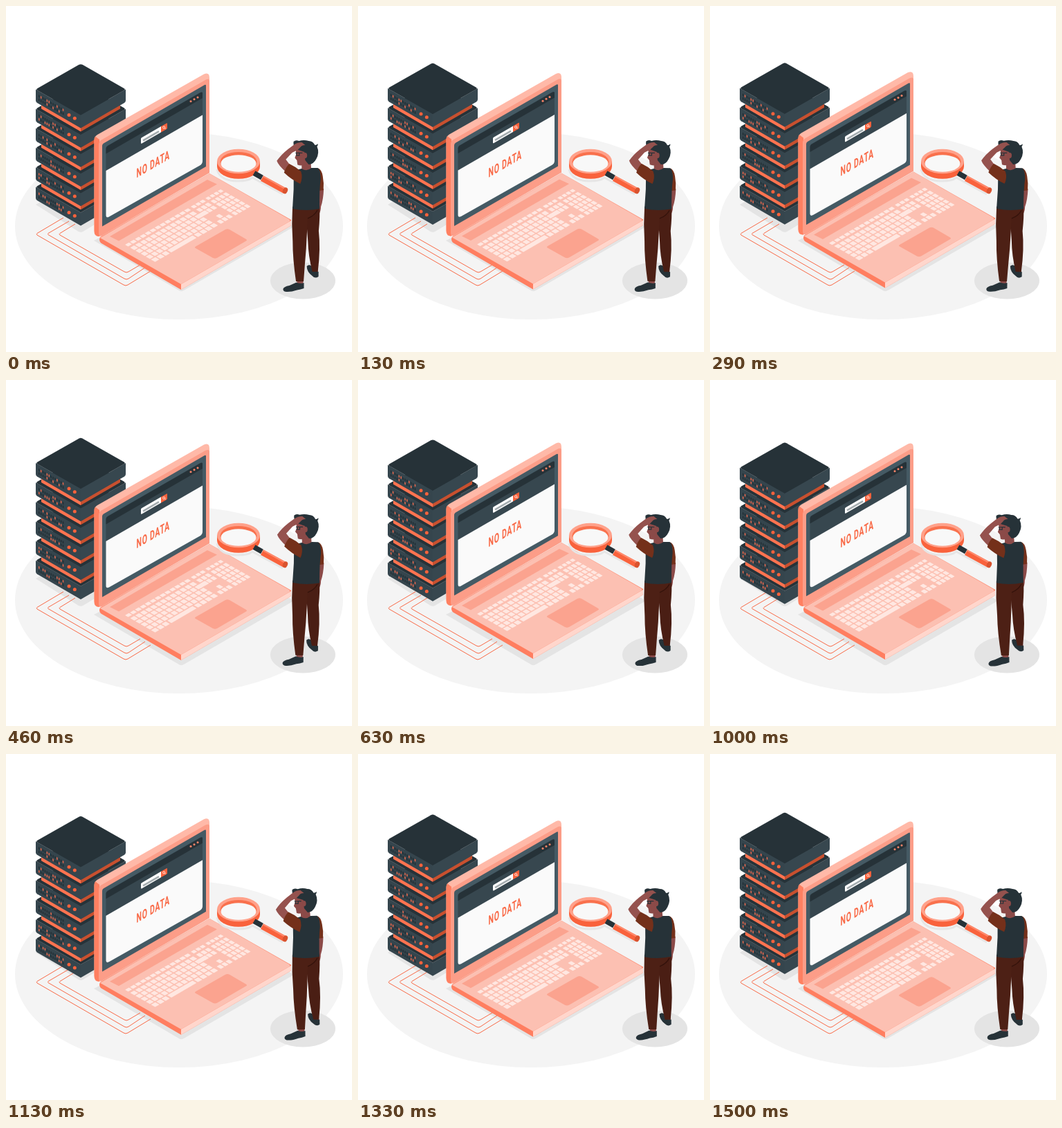
Recreate the animation shown at these times as an HTML page. Size 500 px wide and 500 px high, loop 1540 ms.

```html
<!DOCTYPE html>
<html lang="en">
<head>
<meta charset="utf-8">
<title>No data</title>
<style>
html, body { margin: 0; width: 100%; height: 100%; overflow: hidden; background: #fff; }
svg { display: block; width: 100%; height: 100%; }
text { font: 700 18.5px Roboto, Inter, sans-serif; letter-spacing: 1.2px; fill: #f96a47; }
</style>
</head>
<body>
<svg viewBox="0 0 500 500">
  <ellipse cx="250" cy="318" rx="237" ry="135" fill="#f4f4f4"/>
  <ellipse cx="429" cy="397" rx="47" ry="26.5" fill="#e4e4e4"/>
  <path d="M43 287L104 325.5Q108 328 112 325.5L173 289 108 250z" fill="#e4e4e4"/>
  <path d="M127 339L249 410.5Q253 413.5 257 411L416 319 300 250z" fill="#e4e4e4"/>
  <path d="M83 306L45 328.5Q43.5 329.5 45 331L170 403Q173 405 176 403L209 383M91 311L61 328.5Q60 329.5 61 330.5L171 394Q174 396 177 394L201 378M100 315L78 328.5Q76 329.5 78 331L171 384Q174 386 177 384L194 374" fill="none" stroke="#f96a47"/>

  <g id="servers"></g>

  <g id="laptop">
    <path d="M136 334L294 242 412 309V316Q412 317.5 410 318.5L253 410 138 343Q135 341 135 337z" fill="#ff7e60"/>
    <path d="M253 402L412 310V316Q412 317.5 410 318.5L253 410z" fill="#ffd6cc"/>
    <path d="M136 335L294 242 409 308Q412 310 409 311.7L253 402z" fill="#fcc0b2"/>
    <path d="M150 333L291 251 305 257.5 163 339.5z" fill="#fba38f"/>
    <path d="M274 347.5L317 323Q320 321.5 323 323L347 337Q349 338.3 347 339.5L305 364Q302 365.5 299 364L274 350Q272 349 274 347.5z" fill="#fba38f"/>
    <g id="keys" transform="matrix(1 -.58 1 .57 172 345)" fill="#ffe7e1"></g>

    <path d="M127.500 194Q127.500 188.500 132 186L286 98.500Q294 95 294 104V241L139 332Q127.500 336 127.500 325z" fill="#ffb9a8"/>
    <path d="M127.500 194Q127.500 190 129 188.500L135 193V333Q127.500 333 127.500 325z" fill="#ff8061"/>
    <path d="M134 200Q134 196 138 193.500L288 107Q294 104 294 109V241L139 332Q134 334 134 328z" fill="#fc9d88"/>
    <path d="M139 202Q139 199.500 141 198.400L287 114Q289 113 289 115V232L139 318.600z" fill="#455a64"/>
    <path d="M144.500 206Q144.500 203.500 147 202L281 125Q284 123.500 284 126V159L144.500 239z" fill="#37474f"/>
    <path d="M144.500 206Q144.500 203.500 147 202L281 125Q284 123.500 284 126V133L144.500 213.500z" fill="#263238"/>
    <path d="M144.500 238L284 157.500V224Q284 228 280 230.500L149 304.500Q144.500 307 144.500 302z" fill="#fafafa"/>
    <g fill="#ff8568"><circle cx="267" cy="137.700" r="1.500"/><circle cx="272" cy="134.800" r="1.500"/><circle cx="277" cy="132" r="1.500"/></g>
    <path d="M195 192Q195 191 196 190.300L224 174V182.500L196 198.700Q195 199 195 198z" fill="#fff"/>
    <path d="M198 194.500L221 181.200" stroke="#a5adb0" stroke-width="2.600"/>
    <path d="M224 174L232 169.400Q233 169 233 170V176.500L232 178 224 182.500z" fill="#f9623c"/>
    <path d="M229.300 176.400l1.600 1.200" stroke="#fff" stroke-width=".8"/>
    <circle cx="228.200" cy="175.500" r="1.600" fill="none" stroke="#fff" stroke-width=".8"/>
    <text transform="matrix(.57 -.33 0 1 188.500 248.500)">NO DATA</text>
  </g>

  <g id="magnifier">
    <path d="M305 236Q309 253 335 253Q350 253 356 248L400 272" fill="none" stroke="#e6e6e6" stroke-width="3"/>
    <path d="M305 224.500V232A31 17.800 0 0 0 367 232V224.500z" fill="#f9623c"/>
    <ellipse cx="336" cy="224.500" rx="31" ry="17.800" fill="#ffa18a"/>
    <ellipse cx="336" cy="225" rx="26.500" ry="14" fill="#f9714d"/>
    <ellipse cx="336" cy="227.500" rx="25.500" ry="12.200" fill="#f8f8f8"/>
    <path d="M358.500 241.500L370 248" stroke="#263238" stroke-width="7.500"/>
    <path d="M370 249L403 267" stroke="#f9623c" stroke-width="8.500"/>
    <path d="M371.500 246.200L405 264.800" stroke="#ff8c6f" stroke-width="2"/>
    <ellipse cx="403.500" cy="266.800" rx="3.400" ry="4.700" transform="rotate(25 403.500 266.800)" fill="#d9532f"/>
  </g>

  <g id="person">
    <g fill="#8b4a48">
      <path d="M421 394H430V403H421zM443 380H451V387H443z"/>
      <path d="M453 264H459Q458.500 280 455 290Q455 297 452 301L450 297z"/>
      <path d="M427 226L440 224 441 238Q434 243 427 238z"/>
      <path d="M418 206L434 204V228Q428 232 421 229.500L420 223 417 219.500 419 214z"/>
    </g>
    <path d="M401 409Q402 405.500 410 404L420 399.500Q426 402 431 400V408Q426 410 421 410.500Q411 414 404 413Q400.500 412 401 409zM435 376Q439 372 443 377L446 383 452 384V391Q447 394.500 443 390Q435 384 435 376z" fill="#263238"/>
    <path d="M436 290H453Q454 303 452 325Q455 350 451 384H443Q437 360 436.500 340L434 308z" fill="#4a1e14"/>
    <path d="M414 290H451Q450 300 436 307Q435 330 434 350Q432 375 430.500 398H419.500Q414.500 365 414.500 340Q412.500 315 414 290z" fill="#4d2015"/>
    <path d="M436 307Q446 303 450 295" fill="none" stroke="#32120b" stroke-width="1.200"/>
    <path d="M450 234Q456 236 457.500 246Q459.500 256 458.500 266L452 267z" fill="#74301a"/>
    <path d="M415.500 238L427 235Q434 240 441 234L450 234Q454.500 236 454.500 250Q452.500 265 453 293Q433 297 414 293L415.500 265z" fill="#263238"/>
    <path d="M415 196Q418 193 423 195Q430 193 437 195Q443 195 446 201Q449 201 450 199Q451 201 449 203Q453 212 448 221Q444 229 437 229L432 223 431 211 422 208Q414 204 415 196z" fill="#263238"/>
    <ellipse cx="432" cy="216" rx="2.800" ry="4" fill="#8b4a48"/>
    <path d="M418 212.500H428M419.500 212v4h4v-4" fill="none" stroke="#263238" stroke-width="1.200"/>
    <path d="M391 224Q397 215 407 207L415 201Q420 197 427 197L432 201Q427 201 425 204L421 208 413 212 404 222 411 231 404 240Q393 230 391 224z" fill="#95524e"/>
    <path d="M409 228Q418 232 426 239Q429 248 425 257Q412 251 401.500 241Q404 233 409 228z" fill="#74301a"/>
  </g>
</svg>
<script>
const LOOP = 1540;
const LEVEL_STEP = 28.2;
const el = id => document.getElementById(id);
const shape = (d, fill) => `<path d="${d}" fill="${fill}"/>`;
const box = (x, y, w, h, attrs = '') => `<rect x="${x}" y="${y}" width="${w}" height="${h}" ${attrs}/>`;

let seed = 11;
const random = () => (seed = seed * 16807 % 2147483647) / 2147483647;

function ticks() {
  let out = '';
  for (const y of [5.5, 10.8])
    for (let i = 0; i < 13; i++)
      out += box(4 + i * 2.9, y, 1.5, 3.4, `fill="${random() < .35 ? '#e8664a' : '#222e34'}"`);
  return out;
}

const spacer = shape('M51 141L108 174V182L51 149z', '#ff7350') +
  shape('M108 174L165 141V149L108 182z', '#c8502f');

// Each slab carries the spacer that holds up the slab above it.
function slab(level) {
  return `<g transform="translate(0 ${level * LEVEL_STEP})">` +
    shape('M43 121L108 158V177L45 140.5Q43 139 43 137z', '#35454d') +
    shape('M108 158L173 121V137Q173 139 171 140.5L108 177z', '#37474f') +
    shape('M45.5 119.5L105.5 85.4Q108 84 110.5 85.4L170.5 119.5Q173 121 170.5 122.5L108 158 45.5 122.5Q43 121 45.5 119.5z', '#263238') +
    `<g transform="matrix(1 .57 0 1 43 121)">${ticks()}</g>` +
    '<g fill="#f9623c"><circle cx="91" cy="158" r="2.5"/><circle cx="99.3" cy="162.7" r="2.5"/></g>' +
    (level ? `<g transform="translate(0 ${-LEVEL_STEP})">${spacer}</g>` : '') + '</g>';
}
el('servers').innerHTML = [5, 4, 3, 2, 1, 0].map(slab).join('');

function keyboard() {
  let out = '';
  const run = (a, count, pitch, row) => {
    for (let i = 0; i < count; i++)
      out += box(a + i * pitch, row * 7.5, pitch - 1.5, row ? 6 : 4.5, 'rx=".5"');
  };
  for (let row = 0; row < 5; row++) run(0, 13, 7.1, row);
  run(0, 3, 7.6, 5);
  run(23.5, 1, 38, 5);
  run(62, 4, 7.6, 5);
  for (const row of [0, 1, 2, 5]) run(95, 3, 6.3, row);
  run(88, 1, 14, 2);
  run(101.3, 1, 6.3, 4);
  for (let row = 0; row < 6; row++) run(116, 4, 5.9, row);
  return out;
}
el('keys').innerHTML = keyboard();

const wave = (t, peak) => Math.cos((t - peak) / LOOP * 2 * Math.PI);
const move = (id, transform) => el(id).setAttribute('transform', transform);

function draw(now) {
  const t = now % LOOP;
  move('laptop', `translate(0 ${3.8 * (wave(t, 0) - 1)})`);
  move('servers', `translate(0 ${1.7 - 4.1 * wave(t, 245)})`);
  move('person', `rotate(${.85 * wave(t, 310)} 434 300)`);
  requestAnimationFrame(draw);
}
requestAnimationFrame(draw);
</script>
</body>
</html>
```
